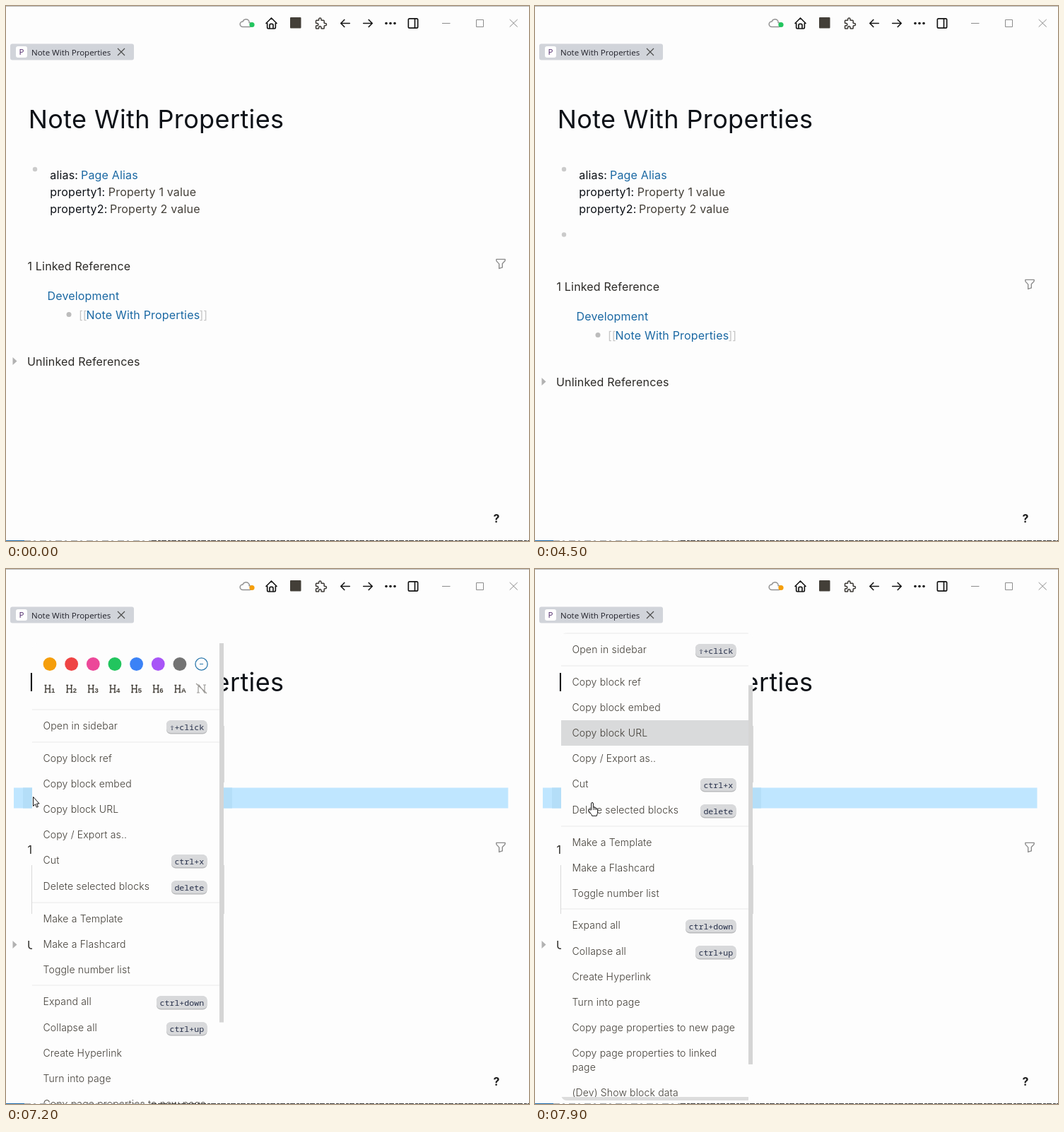
These frames come from a looping animation (740x757 px, 8 s). An HTML page:

```html
<!DOCTYPE html>
<html lang="en">
<head>
<meta charset="utf-8">
<title>Note page</title>
<style>
  html, body { margin: 0; width: 100%; height: 100%; overflow: hidden; background: #fdfdfd; }
  svg { display: block; }
  #stage { width: 100vw; height: 100vh; }
  text { font: 400 16px Inter, sans-serif; font-optical-sizing: none; letter-spacing: .011em; fill: #433f38; white-space: pre; }
  .title { font-size: 36px; fill: #0d1117; }
  .key { fill: #0d1117; }
  .head { fill: #2b2926; }
  .link { fill: #1a68a3; }
  .bracket { fill: #c6c6c6; letter-spacing: 0; }
  .tab { font: 400 11.5px "Open Sans", sans-serif; letter-spacing: 0; fill: #1f1f28; }
  .item { font-size: 14px; font-weight: 300; }
  .kbd { font: 400 11.65px "Noto Sans Mono", "DejaVu Sans Mono", monospace; letter-spacing: 0; fill: #27304a; text-anchor: end; }
  .digit { font: 700 9.5px "Liberation Sans", sans-serif; letter-spacing: 0; }
  .icon { fill: none; stroke-linecap: round; stroke-linejoin: round; }
  .thin { fill: none; stroke: #8c8c8c; stroke-width: 1; }
</style>
</head>
<body>
<svg id="stage" viewBox="0 0 740 757">
  <defs>
    <clipPath id="panelClip"><rect x="37" width="271" height="662" rx="8"/></clipPath>
  </defs>
  <rect width="740" height="757" fill="#fdfdfd"/>
  <rect width="740" height="1" fill="#b9b9b9"/>

  <g id="toolbar"></g>
  <circle id="sync" cx="348" cy="26.5" r="3.6"/>
  <rect x="402" y="16" width="15.5" height="15.5" rx="1" fill="#433f38"/>
  <g fill="#161616">
    <circle cx="538" cy="24.5" r="1.8"/><circle cx="544" cy="24.5" r="1.8"/><circle cx="550" cy="24.5" r="1.8"/>
  </g>
  <path class="thin" d="M617 24.5h11.5M665.5 19.5h10v10h-10zM712.7 19l11 10.6M723.7 19l-11 10.6"/>

  <rect x="6" y="53.5" width="175" height="23" rx="3" fill="#d1d4da"/>
  <rect x="14" y="57" width="16" height="16" rx="3" fill="#fff"/>
  <text class="tab" x="18.6" y="69.3" style="fill:#4b2468">P</text>
  <text class="tab" x="36" y="69.6">Note With Properties</text>
  <path d="M158 60l10 10M168 60l-10 10" stroke="#4a4a4a" stroke-width="1.1"/>

  <text class="title" x="31.8" y="173">Note With Properties</text>
  <circle cx="41" cy="231" r="3.2" fill="#cbcbcb"/>
  <g id="props"></g>

  <g id="newBlock">
    <circle id="halo" cx="41" cy="323.5" r="8" fill="#d2d2d2"/>
    <circle id="dot" cx="41" cy="323.5" r="3.2"/>
  </g>
  <rect id="caret" x="55" y="314" width="1" height="20" fill="#222"/>

  <g id="refs">
    <text class="head" x="30.5" y="374">1 Linked Reference</text>
    <g id="filter"></g>
    <text class="link" x="58.5" y="416">Development</text>
    <circle cx="89" cy="436.5" r="3.5" fill="#bcbcbc"/>
    <text class="bracket" x="103" y="443">[[</text>
    <text class="link" x="113.5" y="443">Note With Properties</text>
    <text class="bracket" x="273.5" y="443">]]</text>
    <path d="M9.5 497v11l6-5.5z" fill="#b2b2b2"/>
    <text class="head" x="30" y="509">Unlinked References</text>
  </g>
  <text x="689.5" y="731" style="font-weight:700;fill:#1c1c1c">?</text>

  <rect id="selection" x="11" y="309.5" width="699.5" height="29" fill="#bfe6ff"/>

  <g id="menu">
    <path d="M24 309.5h13v29h-13zM308 309.5h12v29h-12z" fill="#b4def8"/>
    <path d="M36 419h1v69h-1zM308 222h1v80h-1zM308 419h1v69h-1z" fill="#d9d9d9"/>
    <g id="panel">
      <g clip-path="url(#panelClip)">
        <rect x="37" width="271" height="662" fill="#fdfdfd"/>
        <g id="list">
          <rect id="hover" x="37" y="217" width="265" height="36" fill="#d9dadb"/>
        </g>
        <rect x="37" y="657" width="265" height="5" fill="#dcdcdc"/>
      </g>
      <rect id="thumb" x="302" width="6" height="536.5" fill="#d5d5d5"/>
    </g>
  </g>

  <g>
    <rect y="756" width="26" height="1" fill="#1a68a8"/>
    <path d="M26 756.5h180" stroke="#a4a8ab" stroke-dasharray="9 4 3 6"/>
    <path d="M206 756.5h534" stroke="#3e3e3e" stroke-dasharray="7 2 4 1"/>
  </g>

  <g id="cursor" fill="#fff" stroke="#111" stroke-linejoin="round">
    <path id="arrow" d="M.5.5v13l3-2.8 1.9 4.5 2-.9-1.9-4.3h3.6z"/>
    <g id="hand">
      <path d="M4.6 11V1.9a1.4 1.4 0 0 1 2.8 0V7.6a1.2 1.2 0 0 1 2.3.3v.5a1.1 1.1 0 0 1 2.1.4v.6a1 1 0 0 1 1.9.5V14c0 2.6-1.2 3.2-1.4 5.3H5.6C5.4 17.3 3.4 15.6 1 12.2c-.9-1.4.6-2.6 1.9-1.6z"/>
      <path d="M7.4 7.6V11M9.7 8.2V11M11.8 9.2V11" fill="none" stroke-width=".8"/>
    </g>
  </g>
</svg>

<script>
const LOOP = 8000;
const NS = 'http://www.w3.org/2000/svg';
const $ = id => document.getElementById(id);

function add(parent, tag, attrs, content) {
  const el = document.createElementNS(NS, tag);
  for (const key in attrs) el.setAttribute(key, attrs[key]);
  if (content) el.textContent = content;
  parent.appendChild(el);
  return el;
}

// Icons live on a 24 unit grid, centred on (x, y).
function icon(parent, x, y, d, stroke = '#161616', width = 2, size = 20) {
  add(parent, 'path', {
    class: 'icon', d, stroke, 'stroke-width': width,
    transform: `translate(${x - size / 2} ${y - size / 2}) scale(${size / 24})`
  });
}

function buildPage() {
  const bar = $('toolbar');
  icon(bar, 339.5, 24.5, 'M6.7 18C4.1 18 2 16 2 13.5S4.1 9 6.7 9c.4-1.8 1.8-3.2 3.6-3.7 1.9-.6 4-.2 5.5 1s2.2 3 1.8 4.7h1c1.9 0 3.4 1.6 3.4 3.5S20.5 18 18.5 18z', '#929292', 1.8);
  icon(bar, 375.5, 24.5, 'M5 12H3l9-9 9 9h-2M5 12v7a2 2 0 0 0 2 2h10a2 2 0 0 0 2-2v-7M9 21v-6a2 2 0 0 1 2-2h2a2 2 0 0 1 2 2v6');
  icon(bar, 446, 24.5, 'M4 7h3a1 1 0 0 0 1-1V5a2 2 0 0 1 4 0v1a1 1 0 0 0 1 1h3a1 1 0 0 1 1 1v3a1 1 0 0 0 1 1h1a2 2 0 0 1 0 4h-1a1 1 0 0 0-1 1v3a1 1 0 0 1-1 1h-3a1 1 0 0 1-1-1v-1a2 2 0 0 0-4 0v1a1 1 0 0 1-1 1H4a1 1 0 0 1-1-1v-3a1 1 0 0 1 1-1h1a2 2 0 0 0 0-4H4a1 1 0 0 1-1-1V8a1 1 0 0 1 1-1', '#3a3733', 1.8);
  icon(bar, 480, 24.5, 'M4.5 12h15M4.5 12l6 6M4.5 12l6-6');
  icon(bar, 512, 24.5, 'M4.5 12h15M19.5 12l-6 6M19.5 12l-6-6');
  icon(bar, 576, 24.5, 'M6 4h12a2 2 0 0 1 2 2v12a2 2 0 0 1-2 2H6a2 2 0 0 1-2-2V6a2 2 0 0 1 2-2zM15 4v16');
  icon($('filter'), 700, 364.5, 'M4 4h16v2.2a2 2 0 0 1-.6 1.4L15 12v7l-6 2v-8.5L4.5 7.6A2 2 0 0 1 4 6.2z', '#8b8b8b', 1.8, 18.5);

  const props = [
    ['alias:', 'Page Alias', 106, 'link'],
    ['property1:', 'Property 1 value', 144.8, ''],
    ['property2:', 'Property 2 value', 147, '']
  ];
  props.forEach(([key, value, x, cls], i) => {
    const y = 245 + i * 24;
    add($('props'), 'text', { class: 'key', x: 62.3, y }, key);
    add($('props'), 'text', { class: cls, x, y }, value);
  });
}

function buildMenu() {
  const list = $('list');
  const colX = i => 62 + i * 30.65;

  ['#f59e0b', '#ef4444', '#ec4899', '#22c55e', '#3b82f6', '#a855f7', '#737373']
    .forEach((fill, i) => add(list, 'circle', { cx: colX(i), cy: 29.5, r: 9.4, fill }));
  add(list, 'circle', { cx: colX(7), cy: 29.5, r: 8.6, fill: 'none', stroke: '#2b78ac', 'stroke-width': 1.3 });
  add(list, 'path', { d: `M${colX(7) - 2.5} 29.5h5`, stroke: '#2b78ac', 'stroke-width': 1.2 });

  [...'123456A'].forEach((digit, i) => {
    const x = colX(i) - 7.5;
    add(list, 'path', {
      d: `M${x} 59.5h3m3 0h3m-9 10h3m3 0h3m-7.5-10v10m6-10v10m-6-5h6`,
      fill: 'none', stroke: '#433f38', 'stroke-width': 1.4
    });
    add(list, 'text', { class: 'digit', x: x + 9.6, y: 70 }, digit);
  });
  add(list, 'path', {
    d: 'M272 59v11m-2 0h4m-4-11h3l8 11v-11m-2 0h4M269 57l15 14',
    fill: 'none', stroke: '#9c9a97', 'stroke-width': 1.2
  });

  for (const y of [94, 140, 367, 484])
    add(list, 'rect', { x: 37, y: y - .5, width: 265, height: 1, fill: '#e9e9e9' });

  const items = [
    [117, 'Open in sidebar', '⇧+click'],
    [163, 'Copy block ref'],
    [199, 'Copy block embed'],
    [235, 'Copy block URL'],
    [271, 'Copy / Export as..'],
    [307, 'Cut', 'ctrl+x'],
    [344, 'Delete selected blocks', 'delete'],
    [390, 'Make a Template'],
    [426, 'Make a Flashcard'],
    [462, 'Toggle number list'],
    [507, 'Expand all', 'ctrl+down'],
    [544, 'Collapse all', 'ctrl+up'],
    [580, 'Create Hyperlink'],
    [616, 'Turn into page'],
    [652, 'Copy page properties to new page'],
    [688, 'Copy page properties to linked'],
    [708, 'page'],
    [744, '(Dev) Show block data']
  ];
  for (const [y, label, keys] of items) {
    add(list, 'text', { class: 'item', x: 52.5, y: y + 5 }, label);
    if (!keys) continue;
    const width = keys.length * 7 + 8.5;
    add(list, 'rect', { x: 284.5 - width, y: y - 7.5, width, height: 19, rx: 6, fill: '#b9babc' });
    add(list, 'rect', { x: 284.5 - width, y: y - 8, width, height: 18, rx: 6, fill: '#d8d9db' });
    add(list, 'text', { class: 'kbd', x: 280.3, y: y + 5.8 }, keys);
  }
}

// Pointer stops: time, x, y, shape. Each holds until the next.
const pointer = [
  [0, 0, 0, ''],
  [800, 240, -8, 'arrow'], [900, 206, 14, 'arrow'], [1000, 152, 44, 'arrow'],
  [1100, 96, 72, 'arrow'], [1200, 50, 92, 'arrow'], [1300, 22, 105, 'arrow'],
  [1400, 9, 114, 'arrow'], [1500, 20, 122, 'arrow'], [1600, 36, 130, 'arrow'],
  [1800, 40, 150, 'arrow'], [1900, 52, 205, 'arrow'], [2000, 68, 262, 'arrow'],
  [2100, 78, 298, 'arrow'], [2200, 78, 312, 'hand'],
  [2400, 74, 316, 'hand'], [2500, 66, 322, 'hand'], [2600, 61, 325, 'hand'],
  [4500, 0, 0, ''],
  [5200, 56, 325, 'hand'], [5300, 46, 324, 'hand'], [5400, 38, 323, 'hand'],
  [5500, 34, 323, 'hand'], [5700, 33, 322, 'hand'], [5800, 33, 321, 'hand'],
  [7100, 38, 322, 'arrow'], [7400, 48, 325, 'hand'], [7500, 66, 328, 'hand'], [7600, 75, 330, 'hand']
];
const caretOn = [[4700, 5200], [5700, 6100], [6600, 6800]];

const show = (id, on) => { $(id).style.display = on ? '' : 'none'; };
const shift = (id, x, y) => $(id).setAttribute('transform', `translate(${x} ${y})`);

function render(t) {
  const added = t >= 4500, selected = t >= 7100, hot = t >= 5400 && !selected;
  show('newBlock', added);
  show('halo', hot);
  $('dot').setAttribute('fill', hot ? '#a9a9a9' : '#cbcbcb');
  show('caret', caretOn.some(([from, to]) => t >= from && t < to));
  shift('refs', 0, added ? 29 : 0);
  show('selection', selected);
  $('sync').setAttribute('fill', selected ? '#f59e0b' : '#22c55e');

  const scroll = t >= 7900 ? 93 : t >= 7800 ? 2 : 0;
  show('menu', t >= 7200);
  shift('panel', 0, t >= 7300 ? 90 : 105);
  shift('list', 0, -scroll);
  shift('thumb', 0, scroll * .8);
  show('hover', t >= 7400);

  const [, x, y, shape] = pointer.findLast(stop => stop[0] <= t);
  shift('cursor', x, y);
  show('arrow', shape === 'arrow');
  show('hand', shape === 'hand');
}

buildPage();
buildMenu();
const start = performance.now();
function frame() {
  render((performance.now() - start) % LOOP);
  requestAnimationFrame(frame);
}
frame();
</script>
</body>
</html>
```
